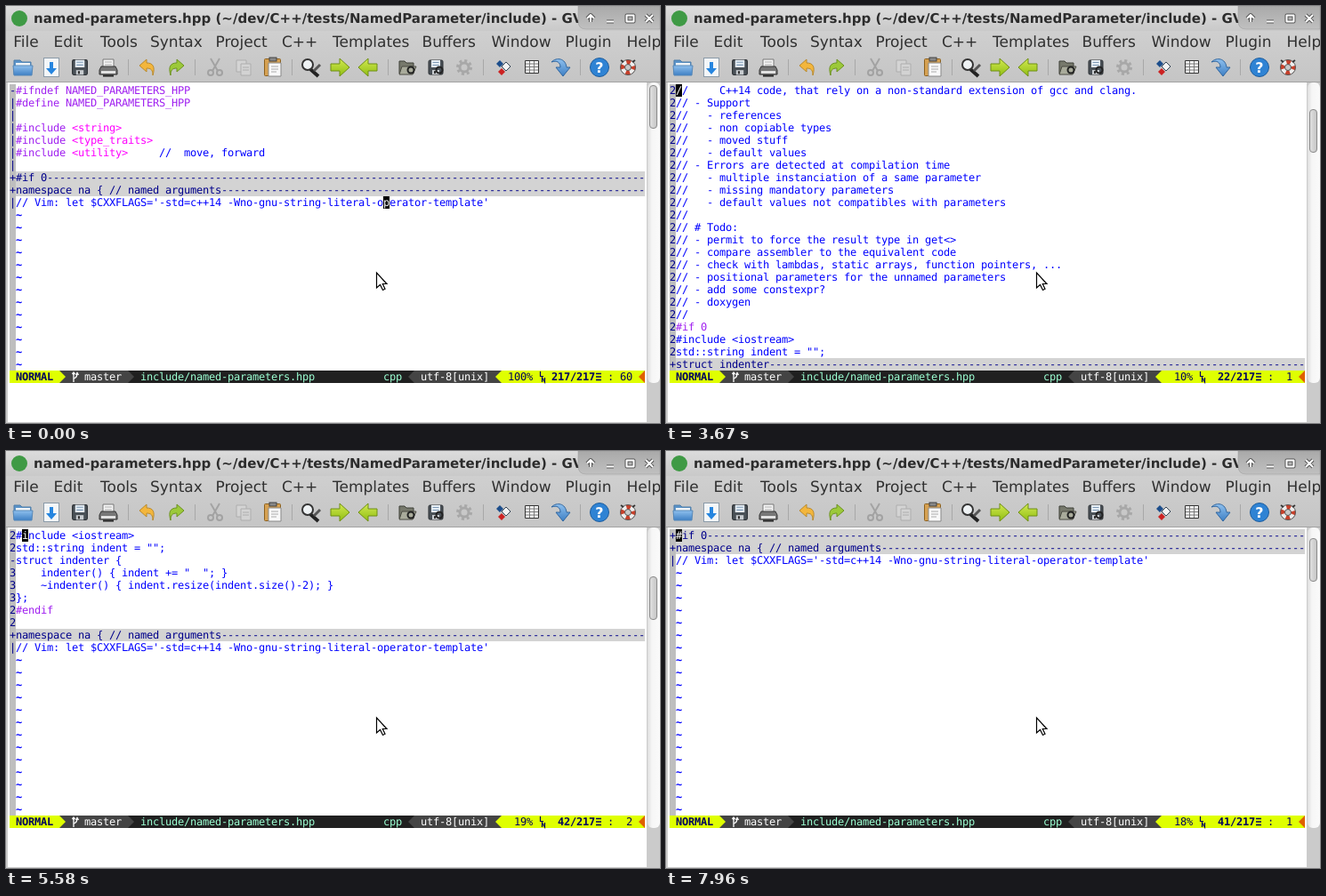
An HTML page for the animation above (8000 ms loop, 735x469 px).

```html
<!DOCTYPE html>
<html lang="en">
<head>
<meta charset="utf-8">
<title>Folding in an editor</title>
<style>
html, body { margin: 0; width: 100%; height: 100%; overflow: hidden; background: #cbcbcb; }
svg { display: block; width: 735px; height: 469px; }
text { white-space: pre; text-rendering: geometricPrecision; }
.ui { font: 17px "DejaVu Sans", sans-serif; fill: #303030; }
.title { font: bold 15px "DejaVu Sans", sans-serif; fill: #2c2c2c; }
.mono text { font: 12px "DejaVu Sans Mono", monospace; letter-spacing: calc(7px - .60205em); }
.mono .b { font-weight: bold; }
.pre { fill: #a020f0; }
.inc { fill: #f0f; }
.com, .til { fill: #00f; }
.mono .til { font-weight: bold; }
.fold { fill: #00008b; }
.faded { opacity: .32; }
</style>
</head>
<body>
<svg viewBox="0 0 735 469">
  <defs>
    <linearGradient id="bar" x2="0" y2="1"><stop stop-color="#dcdcdc"/><stop offset="1" stop-color="#c9c9c9"/></linearGradient>
    <linearGradient id="tools" x2="0" y2="1"><stop stop-color="#cfcfcf"/><stop offset="1" stop-color="#c5c5c5"/></linearGradient>
    <linearGradient id="wm" x2="0" y2="1"><stop stop-color="#a9a9a9"/><stop offset="1" stop-color="#c0c0c0"/></linearGradient>
    <linearGradient id="blue" x2="0" y2="1"><stop stop-color="#8fc0ee"/><stop offset="1" stop-color="#3d7fc4"/></linearGradient>
    <linearGradient id="green" x2="0" y2="1"><stop stop-color="#d3ea52"/><stop offset="1" stop-color="#8fbd12"/></linearGradient>
    <linearGradient id="thumb"><stop stop-color="#e2e2e2"/><stop offset="1" stop-color="#c4c4c4"/></linearGradient>
    <linearGradient id="trough"><stop stop-color="#dedede"/><stop offset=".35" stop-color="#f6f6f6"/><stop offset="1" stop-color="#fafafa"/></linearGradient>
    <path id="arrow" d="M-10-4H0V-10L11 0L0 10V4H-10Z" fill="url(#green)" stroke="#6f8f14"/>
    <path id="turn" d="M-9-2L-1-9V-5C6-5 9-1 6 9C6 3 4 1-1 1V5Z"/>
    <g id="disk">
      <rect x="-8" y="-8" width="16" height="16" rx="1.5" fill="#4a5157" stroke="#2b2f33"/>
      <rect x="-5" y="-8" width="10" height="8" fill="#e6eef5"/>
      <path d="M-3.500-5.500h7m-7 3h7" stroke="#7c98b4"/>
      <rect x="-4" y="3" width="8" height="5" fill="#c8ccd0"/><rect x="-2" y="4" width="2" height="3" fill="#333"/>
    </g>
    <g id="gear" fill="none">
      <circle r="5" stroke="#666" stroke-width="3"/>
      <circle r="7.500" stroke="#666" stroke-width="3" stroke-dasharray="3 2.890"/>
    </g>
  </defs>

  <rect width="735" height="469" fill="#cbcbcb"/>
  <rect width="735" height="28" fill="url(#bar)"/>
  <rect y="28" width="735" height="58" fill="url(#tools)"/>
  <path d="M0 85.500H735" stroke="#a2a2a2"/>
  <circle cx="15" cy="14" r="9" fill="#3f9a45"/>
  <text class="title" x="31" y="19">named-parameters.hpp (~/dev/C++/tests/NamedParameter/include) - GVIM</text>

  <g stroke-linejoin="round">
    <path d="M643 0V17Q643 26 652 26H735V0Z" fill="url(#wm)" stroke="#999" stroke-width=".5"/>
    <g id="buttons" fill="none">
      <path d="M657 18V11M653 14L657 10L661 14M675 17.500H683M697.500 10.500H705.500V17.500H697.500ZM719 10L727 18M727 10L719 18"/>
    </g>
  </g>
  <g id="menu" class="ui"></g>

  <g id="seps" stroke="#a8a8a8"></g>
  <g transform="translate(19 69)">
    <path d="M-10 8V-8H-3L-1-6H9V8Z" fill="#5b93c8" stroke="#4c7ca9"/>
    <path d="M-8-5H8V0H-8Z" fill="#f0f4f7"/>
    <path d="M-11-2H11L10 9H-10Z" fill="url(#blue)" stroke="#5688b8"/>
  </g>
  <g transform="translate(51 69)">
    <rect x="-8.500" y="-10.500" width="17" height="21" fill="#f3f6f8" stroke="#8a9aa8"/>
    <path d="M-2-6H2V1H6L0 8L-6 1H-2Z" fill="#2585df"/>
  </g>
  <use href="#disk" transform="translate(83 69) scale(1.050)"/>
  <g transform="translate(115 69)">
    <path d="M-6-9H6V1H-6Z" fill="#f7f7f7" stroke="#777"/><path d="M-4-6H4M-4-3H4" stroke="#aaa"/>
    <path d="M-8-1H8L10 3V8H-10V3Z" fill="#777" stroke="#333"/><rect x="-8" y="4" width="16" height="3" fill="#e2e2e2"/>
    <path d="M-6 9.500H6" stroke="#222" stroke-width="2"/>
  </g>
  <use href="#turn" x="159" y="69" fill="#f3b63c" stroke="#b98a2d"/>
  <use href="#turn" transform="translate(191 69) scale(-1 1)" fill="#9cc93a" stroke="#6c9220"/>
  <g class="faded" transform="translate(235 69)" fill="none" stroke="#555" stroke-width="2">
    <path d="M-5-10L3 4M5-10L-3 4"/><circle cx="-5" cy="6" r="3"/><circle cx="5" cy="6" r="3"/>
  </g>
  <g class="faded" transform="translate(267 69)" fill="#eee" stroke="#777">
    <path d="M-8-8H3V5H-8Z"/><path d="M-3-4H8V9H-3ZM-1 0H6M-1 3H6"/>
  </g>
  <g transform="translate(300 69)">
    <rect x="-9.500" y="-9.500" width="18" height="19" rx="1" fill="#d6a152" stroke="#8c601e"/>
    <rect x="-4" y="-11" width="8" height="4" fill="#888" stroke="#444"/>
    <path d="M-5-5H9V10H-5Z" fill="#f8f8f8" stroke="#888"/><path d="M-2-1H6M-2 2H6M-2 5H4" stroke="#aaa"/>
  </g>
  <g transform="translate(343 69)" fill="none">
    <path d="M-1 2L8 10" stroke="#222" stroke-width="4"/><path d="M3 4L10-3" stroke="#555" stroke-width="3"/>
    <circle cx="-4" cy="-3" r="6" fill="#eef2f4" stroke="#333" stroke-width="2"/>
  </g>
  <use href="#arrow" x="375" y="69"/>
  <use href="#arrow" transform="translate(407 69) scale(-1 1)"/>
  <g transform="translate(451 69)">
    <path d="M-9 7V-7H-3L-1-5H7V7Z" fill="#77796c" stroke="#3f4038"/><path d="M-6-1H10L6 8H-9Z" fill="#a9ab9b" stroke="#4a4b42"/>
    <circle cx="4" cy="3" r="3.500" fill="none" stroke="#222" stroke-width="2"/>
  </g>
  <use href="#disk" x="483" y="69"/>
  <circle cx="487" cy="72" r="3.500" fill="none" stroke="#222" stroke-width="2"/>
  <use href="#gear" class="faded" x="515" y="69"/>
  <g transform="translate(559 69)">
    <path d="M-4-8L0-4L-4 0L-8-4Z" fill="#1d4e8c"/><path d="M3-6L8-1L3 4L-2-1Z" fill="#f4f4f4" stroke="#345"/>
    <path d="M-2 1L2 5L-2 9L-6 5Z" fill="#c22"/>
  </g>
  <g transform="translate(591 69)">
    <path d="M-7.500-7.500H7.500V6.500H-7.500Z" fill="#fafafa" stroke="#333"/>
    <path d="M-7-4H7M-7-.500H7M-7 3H7M-2.500-7V6M2.500-7V6" stroke="#777"/>
  </g>
  <path transform="translate(623 69)" d="M-10-6C-4-12 6-10 7 0H11L3 10L-5 0H0C0-6-4-8-10-6Z" fill="url(#blue)" stroke="#2f659f"/>
  <circle cx="667" cy="69" r="10.500" fill="#2f83d4" stroke="#1f5e9e"/>
  <text x="667" y="75" text-anchor="middle" style="font:bold 16px 'DejaVu Sans',sans-serif" fill="#fff">?</text>
  <g transform="translate(699 69)" fill="none">
    <circle r="6" stroke="#eee" stroke-width="5"/>
    <circle r="6" stroke="#c8402a" stroke-width="5" stroke-dasharray="4.710" stroke-dashoffset="2.400"/>
    <circle r="8.500" stroke="#555"/><circle r="3.500" stroke="#555"/>
    <path d="M-8-8L-5-6M8-8L5-6" stroke="#333" stroke-width="2"/>
  </g>

  <rect x="2" y="86" width="718" height="382" fill="#fff"/>
  <rect x="721" y="86" width="14" height="338" rx="6" fill="url(#trough)"/>
  <rect id="bar-thumb" x="723.500" width="8" height="48" rx="3.500" fill="url(#thumb)" stroke="#8b8b8b"/>
  <g id="editor" class="mono"></g>
  <path d="M416.500 300V317L420.500 313.500L423.500 319.500L426 318.300L423.300 312.500H428Z" fill="#fff" stroke="#000" stroke-width="1.200"/>
</svg>

<script>
const CELL = 7, ROW = 14, LEFT = 4, TOP = 88, ROWS = 23, LAST = 217, LOOP = 8000;
const $ = id => document.getElementById(id);
const esc = s => s.replace(/&/g, '&amp;').replace(/</g, '&lt;');
const put = (x, y, s, attrs = '') => `<text x="${x}" y="${y + 11}" ${attrs}>${esc(s)}</text>`;
const box = (x, y, w, h, fill) => `<rect x="${x}" y="${y}" width="${w}" height="${h}" fill="${fill}"/>`;

const source = ['',
  ...`#ifndef NAMED_PARAMETERS_HPP
#define NAMED_PARAMETERS_HPP

#include <string>
#include <type_traits>
#include <utility>     //  move, forward

// Named parameters for C++ functions
//
// # Purpose
// - Name the arguments at call site
// - Pass the arguments in any order
//
// # Usage
//   f(name = value, other = value2)
//
// # Features
// - Several versions
//   - C++11 code, with a macro to declare each name
//   - C++14 code, with one variable per name
//   - user-defined literals
//     C++14 code, that rely on a non-standard extension of gcc and clang.
// - Support
//   - references
//   - non copiable types
//   - moved stuff
//   - default values
// - Errors are detected at compilation time
//   - multiple instanciation of a same parameter
//   - missing mandatory parameters
//   - default values not compatibles with parameters
//
// # Todo:
// - permit to force the result type in get<>
// - compare assembler to the equivalent code
// - check with lambdas, static arrays, function pointers, ...
// - positional parameters for the unnamed parameters
// - add some constexpr?
// - doxygen
//
#if 0
#include <iostream>
std::string indent = "";
struct indenter {
    indenter() { indent += "  "; }
    ~indenter() { indent.resize(indent.size()-2); }
};
#endif
`.split('\n')];
source[LAST] = "// Vim: let $CXXFLAGS='-std=c++14 -Wno-gnu-string-literal-operator-template'";

// Flags: c cursor, a outer fold open, b inner fold open, z pending key, x cleared
const steps = [
  [0, 1, 217, 60, 'c'], [280, 1, 217, 60, ''], [530, 1, 217, 60, 'c'],
  [690, 1, 50, 1, 'c'], [1270, 1, 8, 1, 'c'], [1930, 1, 8, 1, ''],
  [2080, 1, 8, 2, 'ca'], [2700, 22, 22, 1, 'x'], [2860, 22, 22, 1, 'ca'],
  [3510, 22, 22, 1, 'a'], [3670, 22, 22, 1, 'ca'], [3820, 43, 43, 1, 'ca'],
  [4500, 43, 44, 1, 'ca'], [4770, 43, 44, 2, 'cab'], [5330, 43, 43, 2, 'cab'],
  [5580, 42, 42, 2, 'cab'], [5980, 21, 42, 1, 'x'], [6100, 21, 42, 1, 'cab'],
  [6970, 21, 41, 1, 'cab'], [7690, 21, 41, 1, 'ab'], [7820, 21, 41, 1, 'cabz'],
  [7960, 8, 41, 1, 'c']
];

function foldAt(n, flags) {
  if (n === 8 && !flags.includes('a')) return ['#if 0', 49];
  if (n === 44 && !flags.includes('b')) return ['struct indenter', 47];
  if (n === 50) return ['namespace na { // named arguments', 216];
}

function visibleRows(top, flags) {
  const rows = [];
  for (let n = top; n <= LAST && rows.length < ROWS; n++) {
    const fold = foldAt(n, flags);
    if (fold) {
      rows.push({ from: n, to: fold[1], mark: '+', text: fold[0].padEnd(101, '-'), fold: true });
      n = fold[1];
      continue;
    }
    const mark = [1, 8, 44].includes(n) ? '-' : n < 8 || n === LAST ? '|' : n > 44 && n < 48 ? '3' : '2';
    rows.push({ from: n, to: n, mark, text: source[n] });
  }
  return rows;
}

function codeText(row, y) {
  const x = LEFT + CELL, { text, from } = row;
  if (row.fold) return put(x, y, text, 'class="fold"');
  const parts = from < 8 && text.match(/^(#include )(<\w+>)( *)(.*)/);
  if (parts) {
    const [, word, file, gap, note] = parts;
    const fileX = x + word.length * CELL;
    return put(x, y, word, 'class="pre"') + put(fileX, y, file, 'class="inc"')
      + put(fileX + (file + gap).length * CELL, y, note, 'class="com"');
  }
  const pre = from < 8 || /^#(if|endif)/.test(text);
  return put(x, y, text, `class="${pre ? 'pre' : 'com'}"`);
}

function statusLine(line, col) {
  const y = 410, lime = '#dfff00', mid = '#444', dark = '#202020';
  const tip = (x, dir, fill) => `<path d="M${x} ${y}L${x + 7 * dir} ${y + 7}L${x} ${y + 14}Z" fill="${fill}"/>`;
  const navy = 'fill="#00005f"', bold = navy + ' class="b"', mint = 'fill="#9cffd3"', white = 'fill="#fff"';
  const pct = Math.floor(line * 100 / LAST) + '%';
  return box(4, y, 714, 14, dark) + box(60, y, 77, 14, mid) + box(459, y, 98, 14, mid)
    + box(4, y, 56, 14, lime) + box(557, y, 161, 14, lime)
    + tip(60, 1, lime) + tip(137, 1, mid) + tip(459, -1, mid) + tip(557, -1, lime) + tip(718, -1, '#df5f00')
    + `<path d="M76 412V423M76 419Q80 418 80 413M74.500 414L76 412L77.500 414M78.500 415L80 412.500L81.500 415" fill="none" stroke="#fff" stroke-width="1.300"/>`
    + `<path d="M600.500 411V416.500H604M602.500 423V418L605.500 423V418" fill="none" stroke="#00005f" stroke-width="1.200"/>`
    + `<path d="M663 413.500H669M663 417H669M663 420.500H669" stroke="#00005f" stroke-width="1.300"/>`
    + put(11, y, 'NORMAL', bold) + put(88, y, 'master', white)
    + put(151, y, 'include/named-parameters.hpp', mint) + put(424, y, 'cpp', mint)
    + put(466, y, 'utf-8[unix]', white) + put(564, y, pct.padStart(4), navy)
    + put(613, y, `${line}`.padStart(3) + '/' + LAST, bold)
    + put(676, y, ':' + `${col}`.padStart(3), navy);
}

function render([, top, line, col, flags]) {
  $('bar-thumb').setAttribute('y', Math.round(89 + 1.28 * (top - 1)) + .5);
  if (flags === 'x') { $('editor').innerHTML = ''; return; }
  const rows = visibleRows(top, flags);
  let out = box(LEFT, TOP, CELL, ROWS * ROW, '#bebebe');
  for (let i = 0; i < ROWS; i++) {
    const y = TOP + i * ROW, row = rows[i];
    if (!row) { out += put(LEFT + CELL, y, '~', 'class="til"'); continue; }
    if (row.fold) out += box(LEFT + CELL, y, 707, ROW, '#d3d3d3');
    out += put(LEFT, y, row.mark, 'class="fold"') + codeText(row, y);
    if (flags.includes('c') && line >= row.from && line <= row.to) {
      const at = row.fold ? 1 : col, x = LEFT + at * CELL;
      out += box(x, y, CELL, ROW, '#000') + put(x, y, row.text[at - 1] || ' ', 'fill="#fff"');
    }
  }
  out += statusLine(line, col);
  if (flags.includes('z')) out += put(641, 452, 'z');
  $('editor').innerHTML = out;
}

const menu = { File: 8.3, Edit: 53.5, Tools: 106, Syntax: 162, Project: 235.5, 'C++': 310, Templates: 367,
  Buffers: 467.5, Window: 545.5, Plugin: 628.5, Help: 697.5 };
$('menu').innerHTML = Object.entries(menu).map(([s, x]) => `<text x="${x}" y="46">${s}</text>`).join('');
$('seps').innerHTML = [137, 212, 321, 429, 536, 645].map(x => `<path d="M${x}.5 60V78"/>`).join('');
const glyph = $('buttons').innerHTML;
$('buttons').innerHTML = `<g stroke="#555" stroke-width="4">${glyph}</g><g stroke="#fff" stroke-width="2">${glyph}</g>`;

const start = performance.now();
let shown;
function tick() {
  const t = Math.max(0, performance.now() - start) % LOOP;
  const step = steps.findLast(s => s[0] <= t);
  if (step !== shown) render(shown = step);
  requestAnimationFrame(tick);
}
tick();
</script>
</body>
</html>
```
